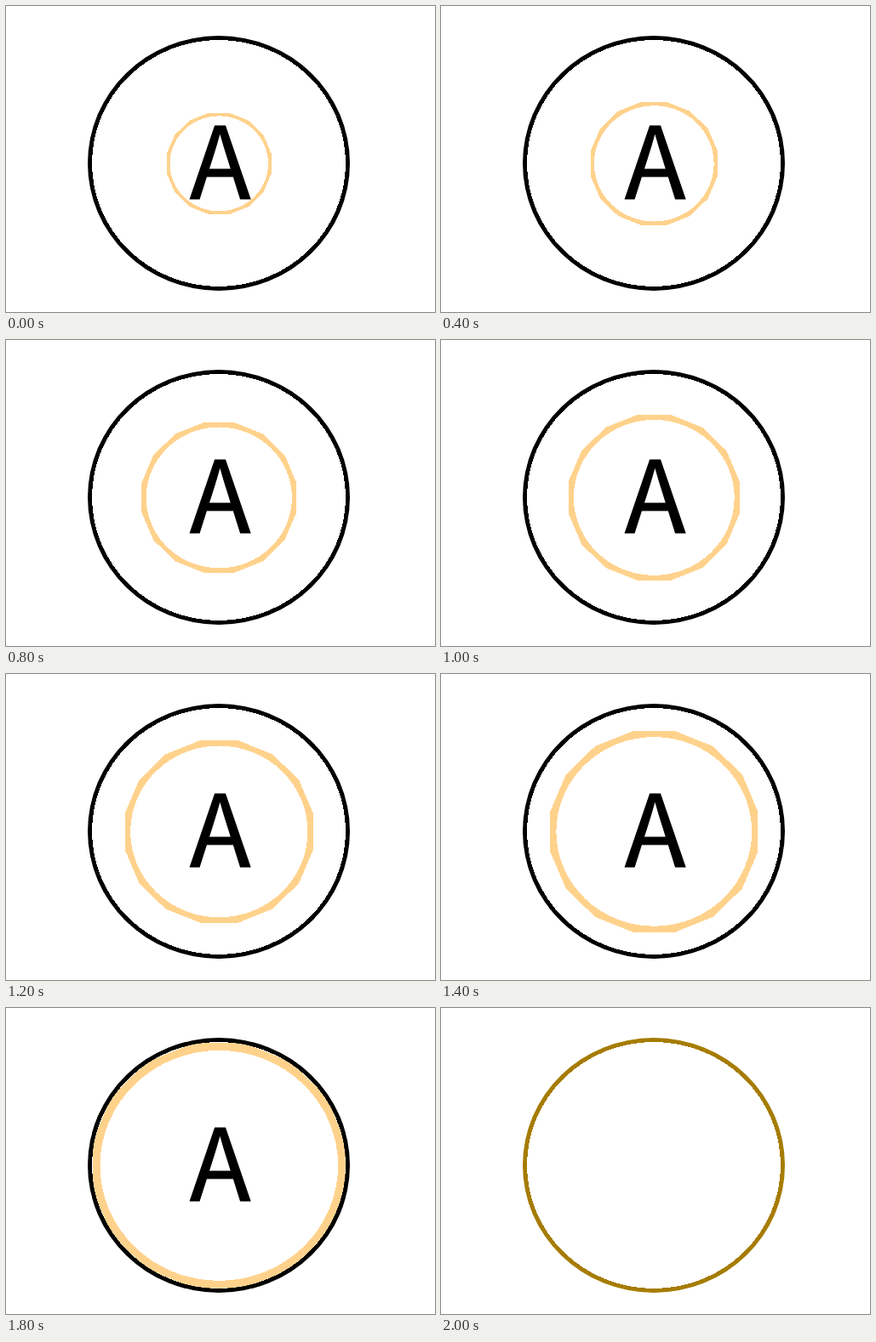
These frames come from a looping animation (504 by 360 pixels, 2.5 s). An HTML page:

```html
<!DOCTYPE html>
<html lang="en">
<head>
<meta charset="utf-8">
<title>Growing ring</title>
<style>
  html, body { margin: 0; width: 100%; height: 100%; overflow: hidden; background: #fff; }
  svg { display: block; width: 504px; height: 360px; }
  #rim.lit { fill: #a67c00; }
  #face { fill: #fff; shape-rendering: crispEdges; }
  #ring { fill: #ffd28c; fill-rule: evenodd; shape-rendering: crispEdges; }
  text {
    font: 118px "Noto Sans CJK JP", "Noto Sans CJK SC", "Noto Sans Mono", sans-serif;
    text-anchor: middle;
    stroke: #000;
  }
</style>
</head>
<body>
<svg viewBox="0 0 504 360">
  <clipPath id="inside"><ellipse cx="250" cy="185" rx="149" ry="145"/></clipPath>
  <ellipse id="rim" cx="250" cy="185" rx="154" ry="150"/>
  <ellipse id="face" cx="250" cy="185" rx="149" ry="145"/>
  <g clip-path="url(#inside)"><path id="ring"/></g>
  <text id="letter" x="251.5" y="226.5">A</text>
</svg>
<script>
  const LOOP = 2500, STEP = 100, GROWTH = 1.0503, SIDES = 16;
  const ring = document.getElementById("ring");
  const rim = document.getElementById("rim");
  const letter = document.getElementById("letter");
  const show = (el, on) => el.setAttribute("visibility", on ? "visible" : "hidden");

  // A flat-sided outer edge around a round hole.
  function ringPath(rx, ry, width) {
    const reach = 1 / Math.cos(Math.PI / SIDES);
    const corners = Array.from({ length: SIDES }, (_, i) => {
      const angle = (i + 0.5) * 2 * Math.PI / SIDES;
      return [rx * reach * Math.cos(angle), ry * reach * Math.sin(angle)];
    });
    const hx = rx - width, hy = ry - width;
    return `M${corners.join("L")}Z` +
      `M${-hx} 0A${hx} ${hy} 0 0 0 ${hx} 0A${hx} ${hy} 0 0 0 ${-hx} 0Z`;
  }

  // The ring grows by a fixed ratio each step until it meets the rim.
  function draw(step) {
    const scale = GROWTH ** Math.min(step, 18);
    ring.setAttribute("transform", `translate(250.3 185.4) scale(${scale})`);
    show(ring, step < 19);
    rim.classList.toggle("lit", step >= 19);
    show(letter, step < 20);
  }

  ring.setAttribute("d", ringPath(61.4, 59.6, 3.6));
  const start = performance.now();
  function tick() {
    const time = (performance.now() - start) % LOOP;
    draw(Math.floor(time / STEP));
    requestAnimationFrame(tick);
  }
  tick();
</script>
</body>
</html>
```
